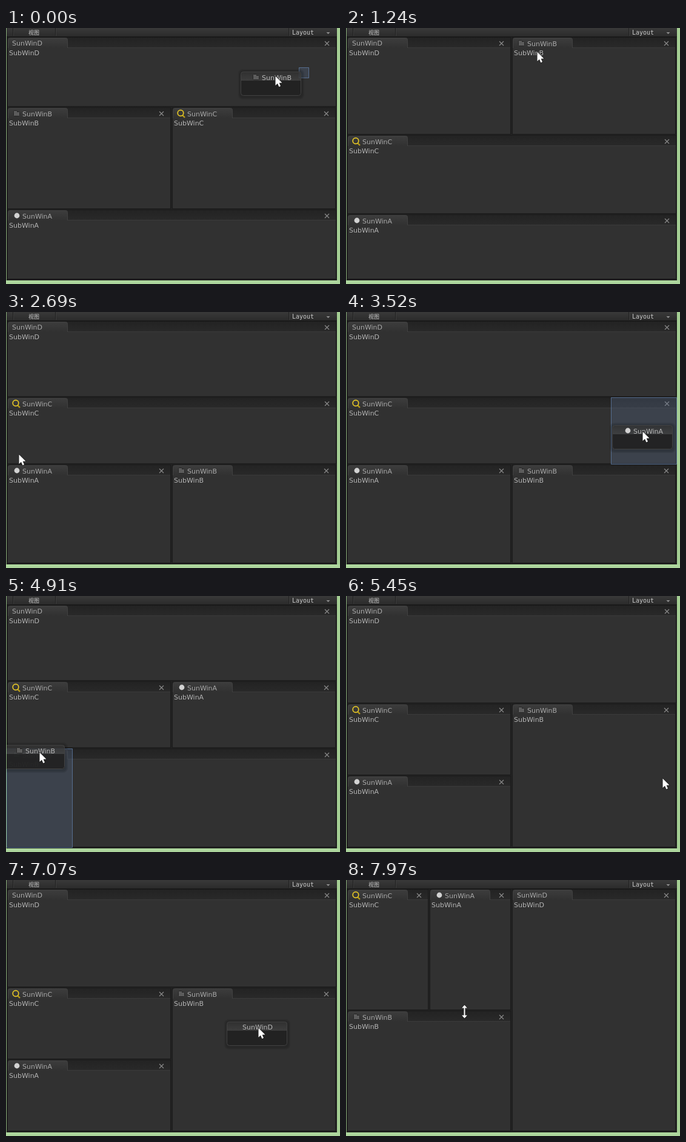
Animation of 551x423 px, one loop 8 s. Source, as an HTML page with a canvas:

```html
<!DOCTYPE html>
<html lang="en">
<head>
<meta charset="utf-8">
<title>Docking panes</title>
<style>
html, body { margin: 0; width: 100%; height: 100%; overflow: hidden; background: #add69d; }
canvas { display: block; width: 551px; height: 423px; }
</style>
</head>
<body>
<canvas id="stage" width="551" height="423"></canvas>
<script>
const g = document.getElementById('stage').getContext('2d');
const LOOP = 8000, TICKS = 59;
const FONT = '11px "DejaVu Sans", Verdana, sans-serif';

// Layout trees: rows are cut at a given y, columns in equal halves.
const rows = (at, a, b) => ({ at, a, b });
const cols = (a, b) => ({ a, b });

function place(node, x, y, r, b) {
  if (typeof node === 'string') return [{ name: node, x, y, r, b }];
  if (node.at) return [...place(node.a, x, y, r, node.at - 3), ...place(node.b, x, node.at, r, b)];
  const w = Math.floor((r - x - 4) / 2);
  return [...place(node.a, x, y, x + w, b), ...place(node.b, x + w + 4, y, x + 2 * w + 4, b)];
}

// Times are in ticks, the screen's refresh beat. Dropping a pane brings in the next layout.
const FIRST = rows(132, 'D', rows(301, cols('B', 'C'), 'A'));
const DRAGS = [
  { name: 'B', grab: 0, drop: 4, dx: -56, dy: -7, next: rows(178, cols('D', 'B'), rows(309, 'C', 'A')) },
  { name: 'B', grab: 11, drop: 17, dx: -56, dy: -10, next: rows(142, 'D', rows(253, 'C', cols('A', 'B'))) },
  { name: 'A', grab: 22, drop: 28, dx: -49, dy: -10, next: rows(142, 'D', rows(253, cols('C', 'A'), 'B')) },
  { name: 'B', grab: 33, drop: 39, dx: -57, dy: -12, next: rows(179, 'D', cols(rows(298, 'C', 'A'), 'B')) },
  { name: 'D', grab: 49, drop: 55, dx: -51, dy: -10, next: cols(rows(217, cols('C', 'A'), 'B'), 'D') }
];

// Where the cursor rests or turns: tick, x, y.
const STOPS = [
  [0, 444, 79], [4, 446, 80], [9, 315, 39], [10, 315, 39], [15, 470, 362], [17, 470, 362],
  [20, 21, 235], [22, 40, 261], [24, 489, 197], [28, 489, 197], [33, 55, 258], [36, 55, 258],
  [39, 518, 300], [41, 526, 302], [48, 42, 30], [49, 42, 23], [53, 485, 285], [55, 485, 285],
  [57, 222, 114], [59, 195, 217]
];

const dragAt = k => DRAGS.find(d => k >= d.grab && k < d.drop);

function panesAt(k) {
  const done = DRAGS.filter(d => d.drop <= k).pop();
  return place(done ? done.next : FIRST, 3, 16, 544, 414);
}

function cursorAt(k) {
  const i = Math.max(1, STOPS.findIndex(s => s[0] >= k));
  const a = STOPS[i - 1], b = STOPS[i];
  const u = (k - a[0]) / (b[0] - a[0]), e = u * u * (3 - 2 * u);
  return [1, 2].map(n => Math.round(a[n] + (b[n] - a[n]) * e));
}

// The outer fifth of the pane under a carried tab is its drop zone.
function zoneAt(k) {
  if (!dragAt(k)) return null;
  const [cx, cy] = cursorAt(k);
  const p = panesAt(k).find(p => cx >= p.x - 2 && cx < p.r + 2 && cy >= p.y && cy <= p.b);
  if (!p) return null;
  const w = (p.r - p.x + 4) / 5, y = Math.max(16, p.y - 1), h = p.b + 2 - y;
  if (cx < p.x - 2 + w) return { x: p.x - 2, y, w, h };
  if (cx > p.r + 2 - w) return { x: p.r + 2 - w, y, w, h };
  return null;
}

// Zones grow from their centre for as long as the cursor stays inside.
function zoneScale(k, zone) {
  const same = z => z && z.x === zone.x && z.y === zone.y;
  let n = 0;
  while (k - n > 0 && same(zoneAt(k - n - 1))) n++;
  return Math.min(1, .16 + .45 * n);
}

function rect(x, y, w, h, fill) {
  g.fillStyle = fill;
  g.fillRect(x, y, w, h);
}

function fade(y0, y1, top, bottom) {
  const f = g.createLinearGradient(0, y0, 0, y1);
  f.addColorStop(0, top);
  f.addColorStop(1, bottom);
  return f;
}

function line(color, width, ...pts) {
  g.strokeStyle = color;
  g.lineWidth = width;
  g.beginPath();
  pts.forEach(([x, y]) => g.lineTo(x, y));
  g.stroke();
}

function round(x, y, w, h, r, fill, stroke) {
  g.beginPath();
  g.roundRect(x, y, w, h, r);
  if (fill) { g.fillStyle = fill; g.fill(); }
  if (stroke) { g.strokeStyle = stroke; g.lineWidth = 1; g.stroke(); }
}

function circle(x, y, r) {
  g.beginPath();
  g.arc(x, y, r, 0, 7);
}

function text(s, x, y, color = '#b4b4b4', font = FONT) {
  g.font = font;
  g.fillStyle = color;
  g.fillText(s, x, y);
}

const ICONS = {
  A(x, y) {
    g.fillStyle = '#d2d2d2';
    circle(x - 9, y - 1, 4.4);
    g.fill();
  },
  B(x, y) {
    round(x - 14.5, y - 5.5, 6, 4, 1, '#5c5c5c', '#242424');
    round(x - 14.5, y - 3.5, 10, 7, 1, '#5c5c5c', '#242424');
    rect(x - 14, y - 4, 5, 2, '#5c5c5c');
  },
  C(x, y) {
    line('#b99b18', 2.4, [x - 8, y + 2], [x - 4, y + 6]);
    g.strokeStyle = '#e6c726';
    g.lineWidth = 1.7;
    circle(x - 11, y - 1.5, 4.8);
    g.stroke();
  },
  D() {}
};

// Only D has no icon, so its title starts further left and a pixel higher.
function title(name, x, y, color) {
  ICONS[name](x, y);
  text('SunWin' + name, x, y + (name === 'D' ? 3 : 4), color);
}

function toolbar() {
  rect(1, 0, 545, 14, fade(0, 14, '#393939', '#2b2b2b'));
  rect(1, 14, 545, 1, '#171717');
  for (const x of [11, 81, 466]) {
    rect(x, 0, 1, 13, '#202020');
    rect(x + 1, 0, 1, 13, '#3d3d3d');
  }
  text('视图', 37, 11, '#d0d0d0', '9px "Noto Sans CJK SC", "Noto Sans CJK", sans-serif');
  text('Layout', 472, 11, '#c8c8c8', '10px "DejaVu Sans Mono", monospace');
  g.fillStyle = '#919191';
  g.beginPath();
  g.moveTo(528.5, 7);
  g.lineTo(534.5, 7);
  g.lineTo(531.5, 10);
  g.fill();
}

function pane({ name, x, y, r, b }) {
  const w = r - x;
  rect(x - 1, y - 1, w + 2, b - y + 2, '#1b1b1b');
  rect(x, y, w, 16, fade(y, y + 16, '#232323', '#292929'));
  rect(x, y + 16, w, b - y - 16, '#313131');
  rect(x, y + 16, w, 1, '#3a3a3a');
  round(x + .5, y + .5, 98, 18, [3, 3, 0, 0], fade(y, y + 17, '#3d3d3d', '#313131'), '#414141');
  rect(x, y + 17, 100, 2, '#313131');
  title(name, x + (name === 'D' ? 7 : 24), y + 10, '#a9a9a9');
  text('SubWin' + name, x + 2, y + 29);
  const cx = r - 14.5, cy = y + 9.5;
  for (const s of [-3.5, 3.5]) line('#8e8e8e', 1.1, [cx - s, cy - 3.5], [cx + s, cy + 3.5]);
}

function highlight(zone, scale) {
  const w = Math.round(zone.w * scale), h = Math.round(zone.h * scale);
  const x = Math.round(zone.x + (zone.w - w) / 2), y = Math.round(zone.y + (zone.h - h) / 2);
  rect(x, y, w, h, 'rgba(86,102,133,.32)');
  g.strokeStyle = 'rgba(104,138,184,.62)';
  g.lineWidth = 1;
  g.strokeRect(x + .5, y + .5, w - 1, h - 1);
}

function ghost(name, x, y) {
  g.save();
  g.beginPath();
  g.rect(1, 16, 545, 400);
  g.clip();
  for (const s of [5, 3]) round(x - s, y - s + 1, 99 + 2 * s, 40 + 2 * s, s + 3, 'rgba(0,0,0,.11)');
  round(x, y + 15, 99, 25, [0, 0, 4, 4], 'rgba(35,35,35,.94)');
  round(x, y, 99, 15, [4, 4, 0, 0], fade(y, y + 15, 'rgba(50,50,50,.8)', 'rgba(66,66,66,.8)'));
  round(x - .5, y + .5, 99, 39, 4, null, '#414141');
  title(name, x + (name === 'D' ? 25 : 34), y + 10, '#b8b8b8');
  g.restore();
}

function shape(x, y, pts) {
  g.beginPath();
  pts.forEach(([px, py]) => g.lineTo(x + px, y + py));
  g.closePath();
  g.lineJoin = 'round';
  g.lineWidth = 1.2;
  g.strokeStyle = '#161616';
  g.stroke();
  g.fillStyle = '#fff';
  g.fill();
}

const ARROW = [[.5, .5], [.5, 16], [4, 12.8], [6.4, 18.2], [9, 17.1], [6.7, 11.8], [11.5, 11.5]];
const HALF = [[0, -11], [4.5, -6], [1, -6]];
const flip = (sx, sy) => HALF.map(([x, y]) => [x * sx, y * sy]);
const SPLIT = [...HALF, ...flip(1, -1).reverse(), ...flip(-1, -1), ...flip(-1, 1).reverse()];

function draw(time) {
  const k = Math.floor(time / LOOP * TICKS + .3);
  rect(0, 0, 551, 423, '#add69d');
  rect(0, 0, 1, 417, '#86ac78');
  rect(546, 0, 5, 417, '#a5cf94');
  rect(1, 0, 545, 417, '#222');
  rect(1, 416, 545, 1, '#191919');
  toolbar();
  panesAt(k).forEach(pane);

  const zone = zoneAt(k), drag = dragAt(k), [x, y] = cursorAt(k);
  if (zone) highlight(zone, zoneScale(k, zone));
  if (drag) ghost(drag.name, x + drag.dx, y + drag.dy);
  if (k >= TICKS) shape(x + .5, y + .5, SPLIT);
  else shape(x, y, ARROW);
}

const start = performance.now();
function tick() {
  draw((performance.now() - start) % LOOP);
  requestAnimationFrame(tick);
}
tick();
</script>
</body>
</html>
```
